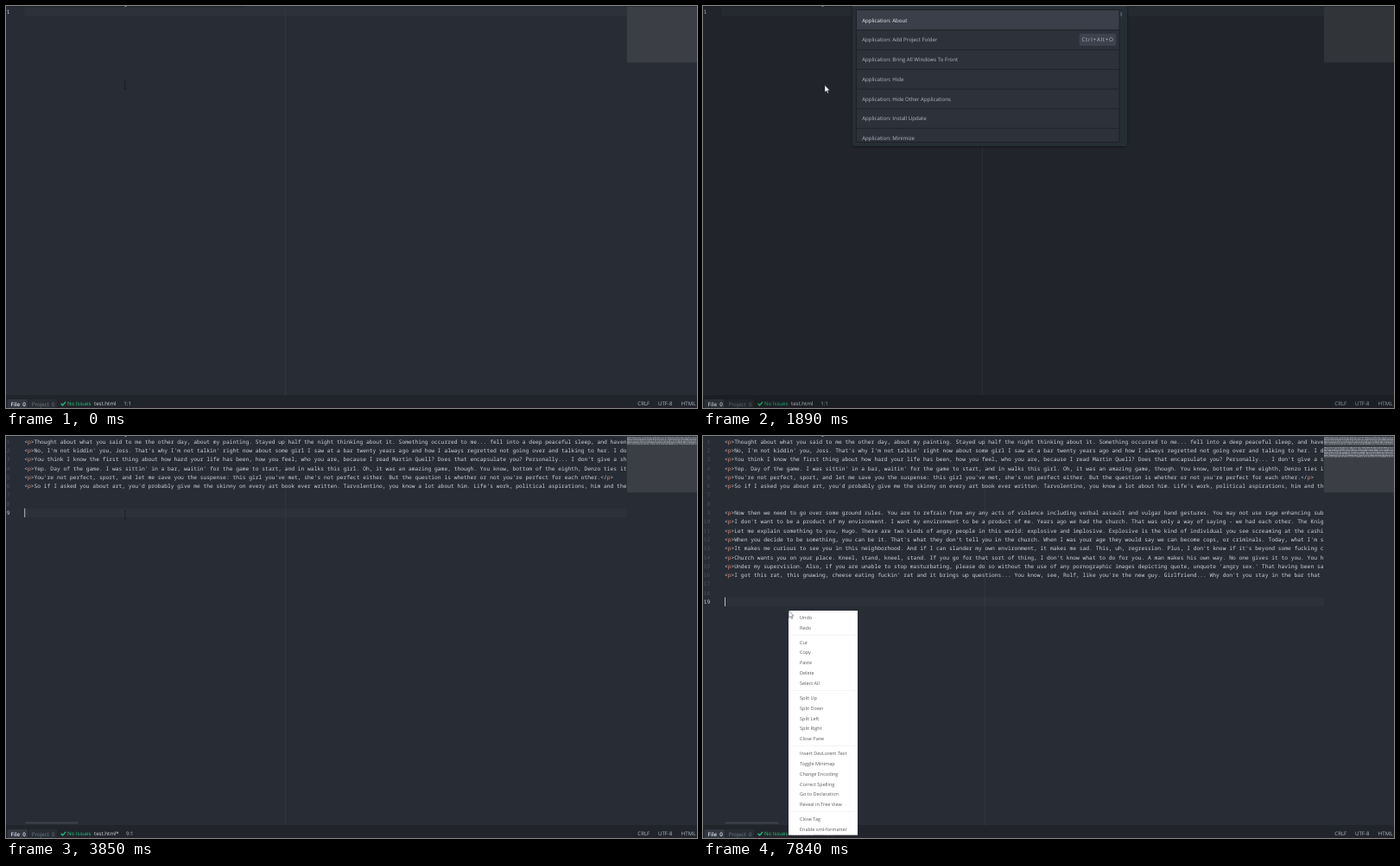
Animation, 800 px wide and 465 px high, one loop 8000 ms. Source, as an HTML page:

```html
<!DOCTYPE html>
<html lang="en">
<head>
<meta charset="utf-8">
<title>Editor</title>
<style>
  html, body { margin: 0; width: 100%; height: 100%; overflow: hidden; background: #282c34; }
  svg { display: block; width: 100vw; height: 100vh; }
  text { white-space: pre; text-rendering: geometricPrecision; }
  .ui { font: 6.1px "Open Sans", "Noto Sans", sans-serif; fill: #b3bac6; }
  .code { font: 500 6.293px "Noto Sans Mono", "DejaVu Sans Mono", monospace; fill: #cdd2da; }
  .tag { fill: #d8907c; }
  .hit { font-weight: 700; fill: #fff; }
  .key { font-size: 6.3px; letter-spacing: .7px; text-anchor: end; }
  .menu { font-size: 5.5px; fill: #5a5a5a; }
</style>
</head>
<body>
<svg id="stage" viewBox="0 0 800 465" preserveAspectRatio="none">
  <defs>
    <clipPath id="codeClip"><rect width="719" height="450"/></clipPath>
    <clipPath id="mapClip"><rect x="719" width="80.5" height="66"/></clipPath>
    <clipPath id="listClip"><rect x="178" y="5" width="304" height="152"/></clipPath>
    <filter id="shadow" x="-5%" y="-10%" width="110%" height="125%">
      <feDropShadow dx="0" dy="1" stdDeviation="1.6" flood-color="#000" flood-opacity=".5"/>
    </filter>
  </defs>

  <rect width="800" height="465" fill="#282c34"/>
  <rect id="current" y="1.3" height="10.3" fill="#2c313a"/>
  <rect id="guide" y="1" width="1" height="449" fill="#31363f"/>
  <rect width="276" height="1" fill="#1f2228"/>
  <rect x="137.5" width="2" height="1" fill="#858b96"/>
  <g id="gutter" class="code" text-anchor="end"></g>
  <g clip-path="url(#codeClip)"><g id="lines" class="code"></g></g>
  <rect id="caret" width="1" height="10.3" fill="#b4bbc8"/>
  <rect id="scroll" y="446.5" width="62" height="2" rx="1" fill="#3d424c"/>
  <rect x="719" y="1" width="81" height="64.3" fill="#3b3e45"/>
  <g id="map" clip-path="url(#mapClip)" fill="#c4cad4" fill-opacity=".68"></g>

  <g class="ui">
    <rect y="450" width="800" height="15" fill="#21252b"/>
    <rect y="464" width="800" height="1" fill="#2b1f28"/>
    <rect x="1.5" y="455" width="23.5" height="10" rx="1" fill="#323741"/>
    <rect x="26" y="455" width="33" height="10" rx="1" fill="#282c33"/>
    <text x="5.6" y="462.7" font-size="6.3" font-weight="600" fill="#e4e7ec">File  0</text>
    <text x="29.8" y="462.7" font-size="6.2" fill="#747a86">Project  0</text>
    <path d="M63.6 459.9l2 2 3.4-4" fill="none" stroke="#27ae74" stroke-width="1.5"/>
    <text x="71" y="461.8" fill="#2bc281">No Issues</text>
    <text id="file" x="102" y="461.8" fill="#d6dae1"></text>
    <text id="pos" y="461.8"></text>
    <text x="731.3" y="461.8">CRLF</text>
    <text x="755" y="461.8">UTF-8</text>
    <text x="781.8" y="461.8">HTML</text>
  </g>

  <rect id="dim" width="800" height="465" fill="#000"/>
  <g id="palette" class="ui">
    <path d="M173 0H491V160a2 2 0 0 1-2 2H175a2 2 0 0 1-2-2Z" fill="#282d35" filter="url(#shadow)"/>
    <rect x="177.5" y="4.5" width="304.5" height="153" fill="#2c313a" stroke="#1e2127" stroke-width="1"/>
    <rect x="178" y="5" width="303.5" height="22.2" fill="#3a3f4a"/>
    <g id="list" clip-path="url(#listClip)"></g>
    <rect id="thumb" x="483" y="7" width="2.2" rx="1" fill="#4b515d"/>
  </g>

  <path id="beam" d="M-1.3 -4.6H1.3M0 -4.6V4.6M-1.3 4.6H1.3" fill="none" stroke="#191c21" stroke-width=".7"/>
  <g id="menu" class="ui menu">
    <rect x="99" y="202" width="80" height="259.6" fill="#fff"/>
  </g>
  <path id="arrow" d="M0 0V8.3L1.9 6.6 3.2 9.4 4.4 8.9 3.2 6.2H5.8Z" fill="#fff" stroke="#15171b" stroke-width=".45"/>
</svg>

<script>
const LOOP = 8000, ROW = 10.3, FRAME = 70;
const MAP_CHAR = .49, MAP_ROW = 3 * MAP_CHAR;
const $ = id => document.getElementById(id);
const NS = "http://www.w3.org/2000/svg";

const paragraphs = [
  "<p>Thought about what you said to me the other day, about my painting. Stayed up half the night thinking about it. Something occurred to me... fell into a deep peaceful sleep, and haven't",
  "<p>No, I'm not kiddin' you, Joss. That's why I'm not talkin' right now about some girl I saw at a bar twenty years ago and how I always regretted not going over and talking to her. I don't",
  "<p>You think I know the first thing about how hard your life has been, how you feel, who you are, because I read Martin Quell? Does that encapsulate you? Personally... I don't give a sh",
  "<p>Yep. Day of the game. I was sittin' in a bar, waitin' for the game to start, and in walks this girl. Oh, it was an amazing game, though. You know, bottom of the eighth, Denzo ties it",
  "<p>You're not perfect, sport, and let me save you the suspense: this girl you've met, she's not perfect either. But the question is whether or not you're perfect for each other.</p>",
  "<p>So if I asked you about art, you'd probably give me the skinny on every art book ever written. Tarvolentino, you know a lot about him. Life's work, political aspirations, him and the",
  "", "",
  "<p>Now then we need to go over some ground rules. You are to refrain from any any acts of violence including verbal assault and vulgar hand gestures. You may not use rage enhancing sub",
  "<p>I don't want to be a product of my environment. I want my environment to be a product of me. Years ago we had the church. That was only a way of saying - we had each other. The Knig",
  "<p>Let me explain something to you, Hugo. There are two kinds of angry people in this world: explosive and implosive. Explosive is the kind of individual you see screaming at the cashi",
  "<p>When you decide to be something, you can be it. That's what they don't tell you in the church. When I was your age they would say we can become cops, or criminals. Today, what I'm s",
  "<p>It makes me curious to see you in this neighborhood. And if I can slander my own environment, it makes me sad. This, uh, regression. Plus, I don't know if it's beyond some fucking c",
  "<p>Church wants you on your place. Kneel, stand, kneel, stand. If you go for that sort of thing, I don't know what to do for you. A man makes his own way. No one gives it to you. You h",
  "<p>Under my supervision. Also, if you are unable to stop masturbating, please do so without the use of any pornographic images depicting quote, unquote 'angry sex.' That having been sa",
  "<p>I got this rat, this gnawing, cheese eating fuckin' rat and it brings up questions... You know, see, Rolf, like you're the new guy. Girlfriend... Why don't you stay in the bar that"
];

// Brackets mark matched letters, the bar separates the shortcut.
const allCommands = ["Application: About", "Application: Add Project Folder|Ctrl+Alt+O",
  "Application: Bring All Windows To Front", "Application: Hide", "Application: Hide Other Applications",
  "Application: Install Update", "Application: Minimize"];
const matches = ["Dev Lorem: [Ge]nerate|Ctrl+Alt+L", "Minimap: [Ge]nerate Babel Plugin",
  "Minimap: [Ge]nerate Coffee Plugin", "Minimap: [Ge]nerate Javascript Plugin",
  "Bracket Matcher: [G]o To [E]nclosing Bracket", "[G]o To Lin[e]: Toggle|Ctrl+G",
  "[G]rammar S[e]lector: Show|Ctrl+Shift+L"];
const firstMatches = matches.map(s => s.replace(/\[Ge\]/, "[G]e").replace(/\[([eE])\]/, "$1"));

const menuGroups = [["Undo", "Redo"], ["Cut", "Copy", "Paste", "Delete", "Select All"],
  ["Split Up", "Split Down", "Split Left", "Split Right", "Close Pane"],
  ["Insert DevLorem Text", "Toggle Minimap", "Change Encoding", "Correct Spelling", "Go to Declaration", "Reveal in Tree View"],
  ["Close Tag", "Enable xml-formatter"]];

const flips = [280, 630, 980, 1400, 1750, 1820, 2800, 4270, 4690, 5040, 5390, 6020, 6370, 7140, 7490];
const caretRows = [[0, 1], [3150, 7], [3640, 8], [3850, 9], [5600, 17], [6510, 18], [6650, 19]];

function add(parent, name, attrs, html = "") {
  const el = document.createElementNS(NS, name);
  for (const k in attrs) el.setAttribute(k, attrs[k]);
  if (html) el.innerHTML = html;
  parent.appendChild(el);
  return el;
}
const set = (id, attrs) => { for (const k in attrs) $(id).setAttribute(k, attrs[k]); };
const show = (el, on) => el.setAttribute("visibility", on ? "visible" : "hidden");
const place = (id, x, y) => set(id, { transform: `translate(${x} ${y})` });

const markup = s => s.replace(/</g, "&lt;").replace(/>/g, "&gt;")
  .replace(/(&lt;\/?)p(&gt;)/g, '$1<tspan class="tag">p</tspan>$2');

const codeLines = paragraphs.map((s, i) =>
  add($("lines"), "text", { y: 8.6 + i * ROW }, markup(s)));
const numbers = Array.from({ length: 19 }, (_, i) =>
  add($("gutter"), "text", { y: 8.6 + i * ROW }, String(i + 1)));

const mapRows = paragraphs.map((s, i) => {
  const g = add($("map"), "g", {});
  for (const word of s.matchAll(/\S+/g)) {
    add(g, "rect", {
      x: 719 + word.index * MAP_CHAR, y: 1.3 + i * MAP_ROW,
      width: word[0].length * MAP_CHAR, height: 2 * MAP_CHAR
    });
  }
  return g;
});

function commandList(items) {
  const g = add($("list"), "g", {});
  items.forEach((item, i) => {
    const [label, key] = item.split("|"), mid = 16.3 + i * 22.75;
    const fill = i ? "#b3bac6" : "#f0f2f5";
    if (i) add(g, "rect", { x: 178, y: mid - 11.7, width: 304, height: 1, fill: "#20242a" });
    add(g, "text", { x: 184.2, y: mid + 2.2, style: `fill:${fill}` },
      label.replace(/\[(\w+)\]/g, '<tspan class="hit">$1</tspan>'));
    if (!key) return;
    const text = add(g, "text", { class: "key", x: 475.7, y: mid + 2.3, style: `fill:${fill}` }, key);
    const w = text.getComputedTextLength() + 5;
    const box = add(g, "rect", { x: 478 - w, y: mid - 7, width: w, height: 14, rx: 1.5, fill: i ? "#3d434e" : "#4a505c" });
    g.insertBefore(box, text);
  });
  return g;
}
const lists = [allCommands, firstMatches, matches].map(commandList);

let menuY = 209.7;
menuGroups.forEach((group, i) => {
  if (i) {
    add($("menu"), "rect", { x: 102, y: menuY - 8.8, width: 74, height: .6, fill: "#ececec" });
  }
  for (const label of group) {
    add($("menu"), "text", { x: 112, y: menuY + 2 }, label);
    menuY += 11.8;
  }
  menuY += 5.3;
});

function drawEditor(t) {
  const row = caretRows.filter(([at]) => t >= at).pop()[1];
  const wide = t >= 5600, left = wide ? 25 : 21.2;
  const y = 1.3 + (row - 1) * ROW;
  set("current", { x: left, y, width: 719 - left });
  set("caret", { x: left, y });
  show($("caret"), flips.filter(at => t >= at).length % 2);
  set("guide", { x: wide ? 326 : 323 });
  set("scroll", { x: wide ? 25.5 : 22 });
  show($("scroll"), t >= 3150);
  place("lines", left, 0);

  numbers.forEach((el, i) => {
    el.setAttribute("x", wide ? 8.3 : 4.5);
    el.setAttribute("fill", i + 1 === row ? "#cdd2da" : "#4b515d");
    show(el, i < row);
  });
  codeLines.forEach((el, i) => {
    show(el, t >= (i < 8 ? 3150 : 5600));
    show(mapRows[i], t >= (i < 8 ? 3220 : 5600));
  });

  const changed = t >= 3500;
  $("file").textContent = changed ? "test.html*" : "test.html";
  $("pos").textContent = row + ":1";
  set("pos", { x: changed ? 139 : 136.3 });
}

function drawPalette(t) {
  const open = t >= 1820 && t < 2800;
  const stage = t < 2100 ? 0 : t < 2240 ? 1 : 2;
  $("palette").style.display = open ? "" : "none";
  lists.forEach((el, i) => { el.style.display = i === stage ? "" : "none"; });
  set("thumb", { height: stage ? 8 : 5 });
  set("dim", { opacity: !open || t < 1890 ? 0 : t < 1960 ? .17 : .33 });
}

function drawPointer(t) {
  const overlay = t >= 1890 && t < 2870, menu = t >= 7770;
  const step = Math.max(0, Math.floor((t - 7280) / FRAME) + 1);
  const p = Math.min(1, step / 3);
  show($("beam"), !overlay && t < 7490);
  place("beam", 138 - 34 * p, 91 + 101 * p);
  show($("arrow"), overlay || menu);
  place("arrow", menu ? 99.3 : 141, menu ? 202 : 91.5);
  show($("menu"), menu);
  set("menu", { opacity: t < 7840 ? .6 : 1 });
}

const start = performance.now();
function frame() {
  const t = (performance.now() - start) % LOOP;
  drawEditor(t);
  drawPalette(t);
  drawPointer(t);
  requestAnimationFrame(frame);
}
frame();
</script>
</body>
</html>
```
